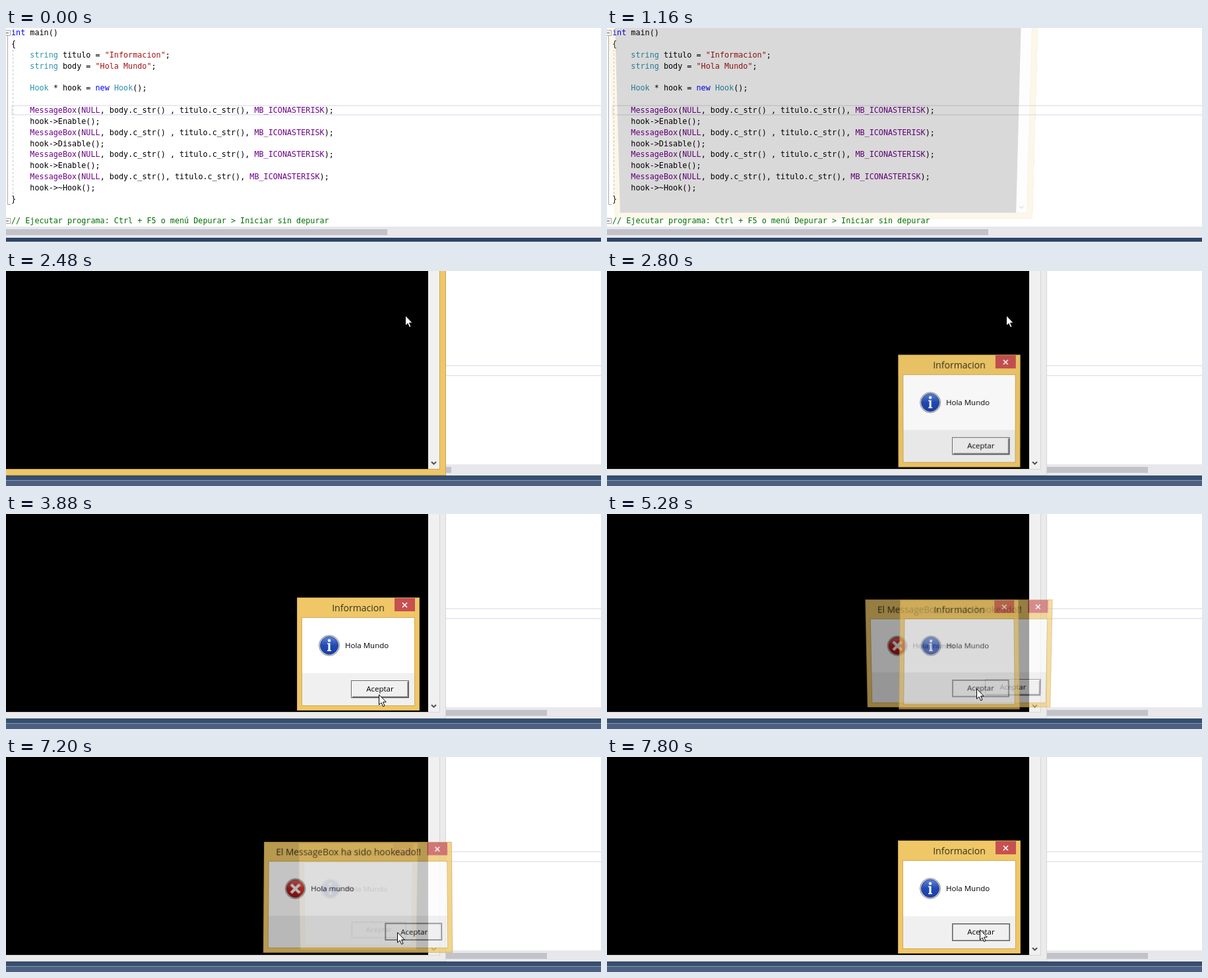
These frames come from a looping animation (902x327 px, 8 s). An HTML page:

```html
<!DOCTYPE html>
<html lang="es">
<head>
<meta charset="utf-8">
<title>MessageBox hook</title>
<style>
html, body { margin: 0; width: 100%; height: 100%; overflow: hidden; background: #fff; }
#stage { position: absolute; left: 0; top: 0; width: 902px; height: 327px; overflow: hidden; background: #fff; }
#stage div, #stage svg, pre { position: absolute; box-sizing: border-box; }
.page { left: 0; top: 0; width: 902px; height: 327px; }
.anim { animation: 8s step-end infinite; }

/* editor */
pre {
  margin: 0; left: 8px; top: -.6px; color: #000;
  font: 11.77px/16.82px "DejaVu Sans Mono", monospace;
}
.k { color: #0000ff; } .t { color: #2b91af; } .s { color: #a31515; }
.m { color: #6f008a; } .c { color: #007000; }
.row { left: 8px; width: 900px; height: 16px; border: 2px solid #eaeaf2; }
.bar { left: 0; width: 902px; height: 17px; background: #e8e8ec; }
.thumb { left: 0; top: 4px; height: 9px; background: #c2c3c9; }
#after { background: #fff; animation-name: after; }
#after .thumb { animation-name: thumb; }
@keyframes after { 0% { visibility: hidden; } 29%, 100% { visibility: visible; } }
@keyframes thumb { 0% { width: 675px; } 32%, 100% { width: 820px; } }

/* console */
#con {
  left: -10px; top: -311px; width: 677px; height: 622px;
  border: 1px solid; animation-name: con, focus;
}
#con .in { left: 8px; top: 8px; width: 659px; height: 604px; background: #000; border: 1px solid; border-color: inherit; border-width: 0 1px 1px 0; }
#con .sb { right: 0; top: 0; width: 17px; height: 603px; background: #f0f0f0; }
@keyframes con {
  0% { opacity: 0; transform: none; }
  14.5% { opacity: .15; transform: perspective(1000px) rotateX(-5deg) scale(.96); }
  15.5% { opacity: .55; transform: perspective(1000px) rotateX(-3deg) scale(.978); }
  16.5% { opacity: .88; transform: translate(.6px, 1px) perspective(1000px) rotateX(-1.5deg) scale(.991); }
  17.5%, 100% { opacity: 1; transform: none; }
}
@keyframes focus {
  0% { background-color: #efc767; border-color: #c9a552; }
  32%, 100% { background-color: #ebebeb; border-color: #d6d6d6; }
}

/* dialogs */
.dlg {
  top: 127px; height: 172px; background: #efc767; border: 1px solid #c9a552;
  font: 11.5px/16px "Open Sans", "Noto Sans", sans-serif; color: #000; white-space: nowrap;
}
#info { left: 441px; width: 186px; z-index: 1; animation-name: info; }
#hook { left: 388px; width: 291px; animation-name: hook; }
.title { left: 0; top: 5px; width: 184px; text-align: center; font-size: 14.05px; line-height: 20px; color: #35301f; }
#hook .title { width: 260px; }
.x { right: 6px; top: 0; width: 31px; height: 20px; background: #c75050; }
.x svg { left: 11px; top: 6px; }
.body { left: 6px; right: 6px; top: 29px; bottom: 6px; background: #fff; border: 1px solid #cfaa58; }
.foot { left: 0; right: 0; bottom: 0; height: 49px; background: #f0f0f0; }
.icon { left: 24px; top: 25px; }
.msg { left: 65px; top: 34px; }
.btn {
  right: 8px; top: 11px; width: 88px; height: 27px; text-align: center; line-height: 24px;
  background: #f0f0f0; border: 1px solid #646464;
  box-shadow: inset 1px 1px #fff, inset -1px -1px #696969, inset -2px -2px #a8a8a8;
}
#info .btn { animation-name: press1; }
#hook .btn { animation-name: press2; }
@keyframes info {
  0% { opacity: 0; transform: none; }
  32% { opacity: .2; transform: perspective(1000px) rotateX(-13deg) scale(.94); }
  33% { opacity: .55; transform: perspective(1000px) rotateX(-9deg) scale(.962); }
  34% { opacity: .85; transform: perspective(1000px) rotateX(-4deg) scale(.982); }
  35% { opacity: .97; transform: perspective(1000px) rotateX(-1deg) scale(.996); }
  35.5% { opacity: 1; transform: none; }
  65% { opacity: .9; transform: perspective(1000px) rotateX(3deg) scale(.99); }
  66% { opacity: .62; transform: perspective(1000px) rotateX(7deg) scale(.977); }
  67% { opacity: .25; transform: perspective(1000px) rotateX(10deg) scale(.96); }
  68% { opacity: .05; transform: perspective(1000px) rotateX(13deg) scale(.945); }
  68.5% { opacity: 0; transform: none; }
  89% { opacity: .12; transform: perspective(1000px) rotateX(-13deg) scale(.94); }
  90% { opacity: .43; transform: perspective(1000px) rotateX(-10deg) scale(.957); }
  91% { opacity: .76; transform: perspective(1000px) rotateX(-5deg) scale(.975); }
  92% { opacity: .94; transform: perspective(1000px) rotateX(-2deg) scale(.992); }
  93%, 100% { opacity: 1; transform: none; }
}
@keyframes hook {
  0% { opacity: 0; z-index: 0; transform: none; }
  65% { opacity: .22; z-index: 0; transform: perspective(1000px) rotateX(-12deg) scale(.945); }
  66% { opacity: .63; z-index: 0; transform: perspective(1000px) rotateX(-8.4deg) scale(.965); }
  67% { opacity: .89; z-index: 0; transform: perspective(1000px) rotateX(-4deg) scale(.984); }
  68% { opacity: .98; z-index: 0; transform: perspective(1000px) rotateX(-1deg) scale(.996); }
  68.5% { opacity: 1; z-index: 2; transform: none; }
  89% { opacity: .96; z-index: 2; transform: perspective(1000px) rotateX(1deg) scale(.995); }
  90% { opacity: .77; z-index: 2; transform: perspective(1000px) rotateX(3deg) scale(.983); }
  91% { opacity: .4; z-index: 2; transform: perspective(1000px) rotateX(8deg) scale(.967); }
  92% { opacity: .1; z-index: 2; transform: perspective(1000px) rotateX(12deg) scale(.95); }
  93%, 100% { opacity: 0; z-index: 0; transform: none; }
}
@keyframes press1 {
  57% { padding: 1px 0 0 2px; box-shadow: inset 0 0 0 1px #a0a0a0; }
  58% { padding: 0; }
}
@keyframes press2 {
  82.5%, 100% { padding: 1px 0 0 2px; box-shadow: inset 0 0 0 1px #a0a0a0; }
}

/* pointer */
#cur { left: 0; top: 0; z-index: 3; animation-name: show, cur; }
@keyframes show { 0% { visibility: hidden; } 30%, 100% { visibility: visible; } }
@keyframes cur {
  0% { transform: translate(605px, 67px); }
  39.5% { transform: translate(608px, 72px); }
  40.5% { transform: translate(615px, 86px); }
  41.5% { transform: translate(622px, 108px); }
  42.5% { transform: translate(624px, 137px); }
  43.5% { transform: translate(619px, 168px); }
  44.5% { transform: translate(609px, 200px); }
  45.5% { transform: translate(596px, 230px); }
  46.5% { transform: translate(582px, 254px); }
  47.5% { transform: translate(571px, 268px); }
  48.5% { transform: translate(565px, 274px); }
  51% { transform: translate(563px, 271px); }
  52% { transform: translate(561px, 267px); }
  53% { transform: translate(560px, 265px); }
  72.5% { transform: translate(580px, 265px); }
  73.5% { transform: translate(591px, 265px); }
  75.5% { transform: translate(592px, 265px); }
  77.5% { transform: translate(592px, 266px); }
  78.5% { transform: translate(593px, 266px); }
  95% { transform: translate(585px, 265px); }
  96% { transform: translate(574px, 263px); }
  97% { transform: translate(567px, 262px); }
  97.5%, 100% { transform: translate(565px, 262px); }
}
</style>
</head>
<body>
<div id="stage">
  <div class="page">
    <div class="row" style="top:117px"></div>
    <svg width="14" height="302" style="left:0;top:0" fill="none" stroke="#a5a5a5">
      <path d="M2.5 12V268.5H7M-2 3.5H6.5V11.5H-2M-2 289.5H6.5V297.5H-2"/>
      <path d="M0 7.5H4M0 293.5H4" stroke="#555"/>
      <path d="M10.5 33V252" stroke="#c4c4c4" stroke-dasharray="3 3"/>
    </svg>
<pre><span class="k">int</span> main()
{
    <span class="t">string</span> titulo = <span class="s">"Informacion"</span>;
    <span class="t">string</span> body = <span class="s">"Hola Mundo"</span>;

    <span class="t">Hook</span> * hook = <span class="k">new</span> <span class="t">Hook</span>();

    <span class="m">MessageBox</span>(<span class="m">NULL</span>, body.c_str() , titulo.c_str(), <span class="m">MB_ICONASTERISK</span>);
    hook-&gt;Enable();
    <span class="m">MessageBox</span>(<span class="m">NULL</span>, body.c_str() , titulo.c_str(), <span class="m">MB_ICONASTERISK</span>);
    hook-&gt;Disable();
    <span class="m">MessageBox</span>(<span class="m">NULL</span>, body.c_str() , titulo.c_str(), <span class="m">MB_ICONASTERISK</span>);
    hook-&gt;Enable();
    <span class="m">MessageBox</span>(<span class="m">NULL</span>, body.c_str(), titulo.c_str(), <span class="m">MB_ICONASTERISK</span>);
    hook-&gt;~Hook();
}

<span class="c">// Ejecutar programa: Ctrl + F5 o menú Depurar &gt; Iniciar sin depurar</span></pre>
    <div class="bar" style="top:302px"><div class="thumb" style="width:578px"></div></div>
    <div style="left:0;top:319px;width:902px;height:6px;background:#2f4468"></div>
    <div style="left:0;top:325px;width:902px;height:2px;background:#dfe3ea"></div>
  </div>

  <div id="after" class="page anim">
    <div class="row" style="top:143px;height:17px"></div>
    <div class="bar" style="top:294px"><div class="thumb anim"></div></div>
    <div style="left:0;top:311px;width:902px;height:16px;background:#364e6f"></div>
    <div style="left:0;top:318px;width:902px;height:9px;background:#4d6082;border-top:1px solid #8798b3"></div>
  </div>

  <div id="con" class="anim">
    <div class="in">
      <div class="sb">
        <svg width="9" height="7" style="left:4px;bottom:5px"><path d="M1 1.2L4.5 4.7L8 1.2" fill="none" stroke="#505050" stroke-width="2"/></svg>
      </div>
    </div>
  </div>

  <div id="info" class="dlg anim">
    <div class="title">Informacion</div>
    <div class="x"><svg width="9" height="9"><path d="M1 1L8 8M8 1L1 8" stroke="#fff" stroke-width="1.6"/></svg></div>
    <div class="body">
      <div class="foot"><div class="btn anim">Aceptar</div></div>
      <svg class="icon" width="34" height="34">
        <defs><linearGradient id="blue" x2="0" y2="1"><stop stop-color="#5f87d8"/><stop offset=".5" stop-color="#2149b4"/><stop offset="1" stop-color="#1c3fa8"/></linearGradient></defs>
        <circle cx="17" cy="17" r="15.5" fill="#d9dce2" stroke="#85888f"/>
        <circle cx="17" cy="17" r="13.5" fill="url(#blue)" stroke="#2a4288"/>
        <circle cx="17" cy="9.5" r="2.2" fill="#fff"/>
        <path d="M14 13.5H18.5V24H20V25.5H14V24H15.5V15H14Z" fill="#fff"/>
      </svg>
      <div class="msg">Hola Mundo</div>
    </div>
  </div>

  <div id="hook" class="dlg anim">
    <div class="title">El MessageBox ha sido hookeado!!</div>
    <div class="x"><svg width="9" height="9"><path d="M1 1L8 8M8 1L1 8" stroke="#fff" stroke-width="1.6"/></svg></div>
    <div class="body">
      <div class="foot"><div class="btn anim">Aceptar</div></div>
      <svg class="icon" width="34" height="34">
        <defs><linearGradient id="red" x2="0" y2="1"><stop stop-color="#d9605c"/><stop offset=".5" stop-color="#b81c1c"/><stop offset="1" stop-color="#a51414"/></linearGradient></defs>
        <circle cx="17" cy="17" r="15.5" fill="#d0d0d0" stroke="#77787a"/>
        <circle cx="17" cy="17" r="13.5" fill="url(#red)" stroke="#7c2020"/>
        <path d="M10.5 10.5L23.5 23.5M23.5 10.5L10.5 23.5" stroke="#eee" stroke-width="4.5"/>
      </svg>
      <div class="msg">Hola mundo</div>
    </div>
  </div>

  <svg id="cur" class="anim" width="14" height="21">
    <path d="M.5 .8V16.2L4 12.9L6.6 18.7L9 17.6L6.5 12H11.3Z" fill="#fff" stroke="#000"/>
  </svg>
</div>
</body>
</html>
```
